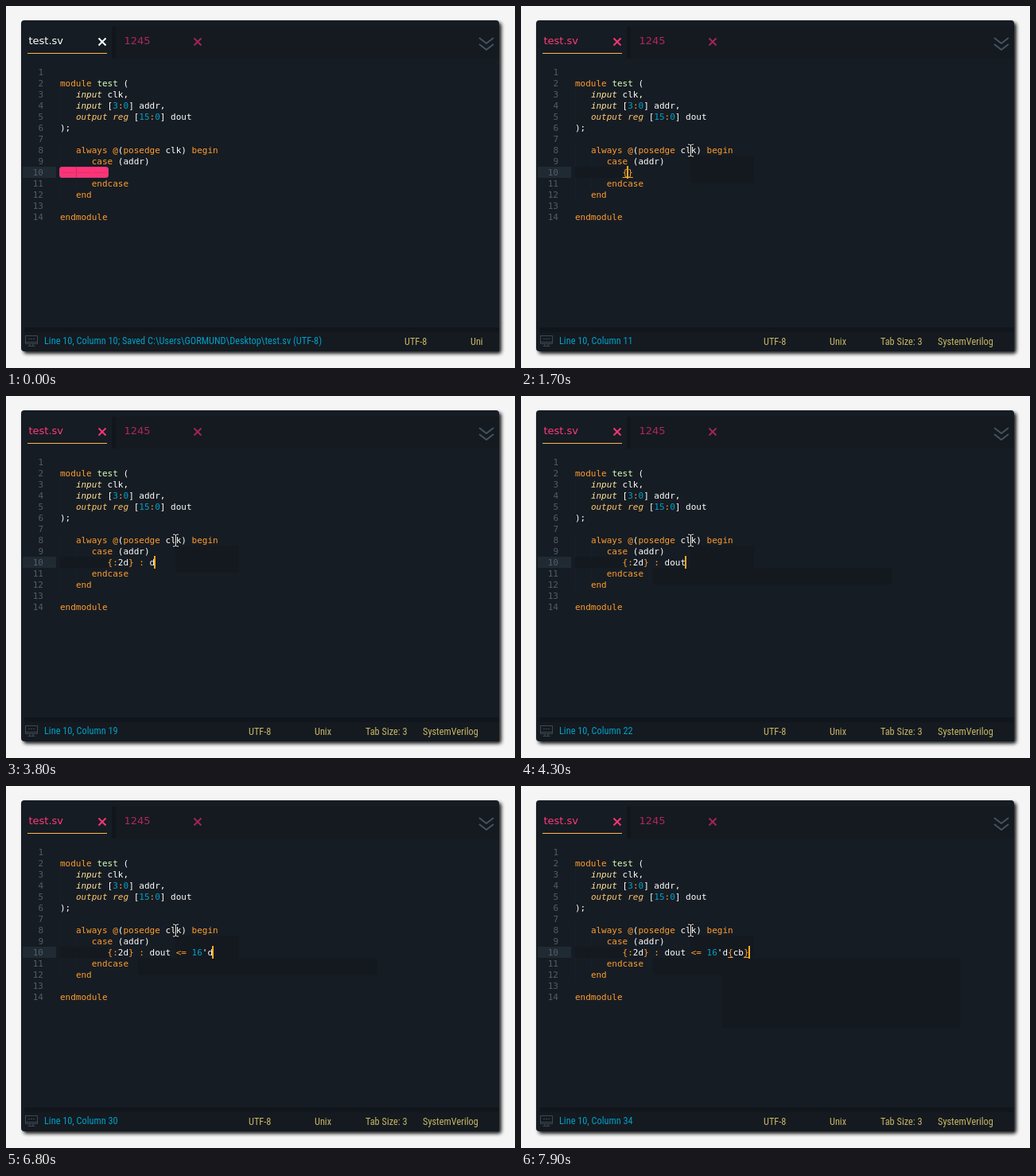
An HTML page for the animation above (8000 ms loop, 640x455 px).

```html
<!DOCTYPE html>
<html lang="en">
<head>
<meta charset="utf-8">
<title>Code editor</title>
<style>
html, body { margin: 0; width: 100%; height: 100%; overflow: hidden; background: #f5f5f5; }
svg { display: block; }
text { white-space: pre; }
.code { font: 11px "DejaVu Sans Mono", monospace; fill: #fff; }
.tab { font: 13px "DejaVu Sans", sans-serif; }
.status { font: 12.3px "Roboto Condensed", Roboto, sans-serif; font-stretch: 75%; fill: #c9b763; }
.k { fill: #ff9d2e; }
.n { fill: #00a0c8; }
.i { fill: #ffe49a; font-style: italic; }
.o { fill: #ffc66d; font-style: italic; }
.f { fill: #d8ffb8; }
.g { fill: #525d68; }
</style>
</head>
<body>
<svg width="640" height="455" viewBox="0 0 640 455">
  <defs>
    <filter id="blur" x="-5%" y="-5%" width="110%" height="110%"><feGaussianBlur stdDeviation="2"/></filter>
    <clipPath id="bar"><rect x="19" y="405" width="581" height="29"/></clipPath>
    <path id="cross" d="M-4.5-4.5 4.5 4.5M4.5-4.5-4.5 4.5" stroke-width="2"/>
    <path id="beam" d="M-3.5-7.5H-1L0-6.5 1-7.5H3.5M0-6.5V6.5M-3.5 7.5H-1L0 6.5 1 7.5H3.5"/>
  </defs>

  <rect x="22" y="21" width="601" height="416" rx="4" fill="#1a1a1a" filter="url(#blur)"/>
  <rect x="19" y="18" width="601" height="416" rx="4" fill="#161c23"/>
  <path d="M133 26H620V66H133Z" fill="#141a20"/>
  <path d="M133 26h5v40h-5z" fill="#11161c"/>
  <path d="M23 404H620V410H23Z" fill="#11161c"/>
  <path d="M23 410H620V434H23Z" fill="#141a20"/>

  <text id="tab" class="tab" x="28.5" y="48">test.sv</text>
  <text class="tab" x="148.5" y="48" fill="#b3265a">1245</text>
  <use id="close" href="#cross" x="121" y="45"/>
  <use href="#cross" x="241" y="45" stroke="#a12652"/>
  <path d="M27 59.5H127" stroke="#ffb454"/>
  <path d="M595 40l9 7 9-7M595 48l9 7 9-7" fill="none" stroke="#46525f" stroke-width="2"/>

  <g id="ghosts" fill="#13191f"></g>
  <path d="M21 202H63V216H21Z" fill="#202a33"/>
  <path d="M68.5 104V146M68.5 174V244M88.5 188V230" stroke="#1b2229" stroke-dasharray="1 1"/>
  <g id="lines" class="code"></g>

  <g id="selection">
    <rect x="67.5" y="202.5" width="61" height="13" rx="2.5" fill="#ff3377" stroke="#d13a78"/>
    <path d="M70 209.5H87M90 209.5H107M109 209.5H127" stroke="#c83a70"/>
    <path d="M88.5 203V216" stroke="#8e2850" stroke-dasharray="1 1"/>
  </g>
  <g id="typing">
    <path d="M68 202H128V216H68Z" fill="#13191f"/>
    <text id="typed" class="code" x="127.6" y="213"></text>
    <path id="match" stroke="#e5a03c"/>
    <rect id="caret" y="201" width="2" height="16" fill="#ffa91f"/>
  </g>

  <g id="mouse" fill="none">
    <use href="#beam" stroke="#000" stroke-width="3"/>
    <use href="#beam" stroke="#fff"/>
  </g>

  <g fill="none" stroke="#3e4852">
    <path d="M24.5 414.5H39.5V424.5H24.5ZM24.5 422.5H39.5M30 425V427.5M34 425V427.5M27.5 427.5H36.5"/>
    <path d="M28 418.5H36" stroke-dasharray="2 1"/>
  </g>
  <g class="status" clip-path="url(#bar)">
    <text id="place" x="48" y="425" fill="#00a0c8"></text>
    <g id="info">
      <text x="305" y="426">UTF-8</text>
      <text x="388" y="426">Unix</text>
      <text x="452" y="426">Tab Size: 3</text>
      <text x="524" y="426">SystemVerilog</text>
    </g>
  </g>
</svg>
<script>
const LOOP = 8000, CHAR = 6.622, LEFT = 127.6;
const $ = id => document.getElementById(id);
const show = (el, on) => el.setAttribute("visibility", on ? "visible" : "hidden");
const clamp = v => Math.min(1, Math.max(0, v));
const mix = (a, b, p) => a + (b - a) * clamp(p);

// "k~word" tags a run with a colour class; runs are separated by "|".
const paint = line => line.split("|").map(run => {
  const tag = /^([kniof])~(.*)$/.exec(run);
  return tag ? `<tspan class="${tag[1]}">${tag[2]}</tspan>` : run;
}).join("");

const source = [
  "", "k~module| |f~test| (", "   |i~input| clk,", "   |i~input| [|n~3|k~:|n~0|] addr,",
  "   |o~output reg| [|n~15|k~:|n~0|] dout", ");", "",
  "   |k~always @|(|k~posedge| clk) |k~begin", "      |k~case| (addr)", "",
  "      |k~endcase", "   |k~end", "", "k~endmodule"
];
$("lines").innerHTML = source.map((line, i) => {
  const y = 87 + 14 * i;
  return `<text class="g" x="47" y="${y}" text-anchor="end">${i + 1}</text><text x="68" y="${y}">${paint(line)}</text>`;
}).join("");

// The caret moves one column further along the statement at each of these times.
const statement = "{:2d} : dout <= 16'd{cb}";
const times = [1600, 2200, 2400, 2700, 2900, 3100, 3300, 3500, 3800, 3900, 4100, 4300,
  4400, 4600, 4800, 5400, 5700, 6000, 6500, 6800, 7100, 7300, 7700, 7900];

// Faint marks that closed popups leave behind: time, x, y, width, height.
const ghosts = [
  [1700, 213, 188, 80, 34], [4000, 166, 216, 301, 21],
  [6900, 166, 216, 373, 21], [7400, 253, 216, 300, 88]
].map(([at, x, y, width, height]) => {
  const el = document.createElementNS("http://www.w3.org/2000/svg", "rect");
  Object.entries({ x, y, width, height }).forEach(([k, v]) => el.setAttribute(k, v));
  $("ghosts").append(el);
  return { at, el };
});

// A brace pair is open while the caret is between its ends or just after them.
const inFirst = n => n > 0 && n < 6;
const inSecond = n => n > 20;

function markup(n) {
  const closed = inFirst(n) && n < 5 || inSecond(n) && n < 24;
  const text = statement.slice(0, n) + (closed ? "}" : "");
  return text.replace(/<=?|[:{}]|\b\d+\b/g, s => `|${/\d/.test(s) ? "n" : "k"}~${s}|`);
}

function mousePos(t) {
  const enter = (t - 200) / 300;
  const y = t < 600 ? mix(208, 198, enter) : mix(198, 181.5, (t - 600) / 200);
  return [mix(259, 213.5, enter), y];
}

let lastCount = -1;
function draw(now) {
  const t = Math.floor(now % LOOP / 100) * 100;
  const n = times.filter(at => at <= t).length;
  const edited = n > 0;

  show($("selection"), !edited);
  show($("typing"), edited);
  $("tab").setAttribute("fill", edited ? "#ff3a7c" : "#fff");
  $("close").setAttribute("stroke", edited ? "#f23674" : "#fff");
  if (n !== lastCount) {
    $("typed").innerHTML = paint(markup(n));
    lastCount = n;
  }

  const column = i => LEFT + CHAR * i;
  const under = i => `M${column(i)} 215.5h${CHAR}`;
  const pair = inFirst(n) ? [0, Math.min(n, 4)] : inSecond(n) ? [20, Math.min(n, 23)] : [];
  $("match").setAttribute("d", pair.map(under).join(""));
  $("caret").setAttribute("x", Math.round(column(n) - 1));
  const blink = t >= 2000 && t < 2200 ? 0 : t >= 4900 && t < 5400 ? clamp((5100 - t) / 300) : 1;
  $("caret").setAttribute("opacity", blink);

  ghosts.forEach(g => show(g.el, t >= g.at));
  show($("mouse"), t >= 200);
  $("mouse").setAttribute("transform", `translate(${mousePos(t)})`);

  const saved = t < 1000;
  $("place").textContent = `Line 10, Column ${10 + n}` +
    (saved ? "; Saved C:\\Users\\GORMUND\\Desktop\\test.sv (UTF-8)" : "");
  $("info").setAttribute("transform", `translate(${saved ? 196 : 0})`);
}

const start = performance.now();
(function tick() {
  draw(performance.now() - start);
  requestAnimationFrame(tick);
})();
</script>
</body>
</html>
```
